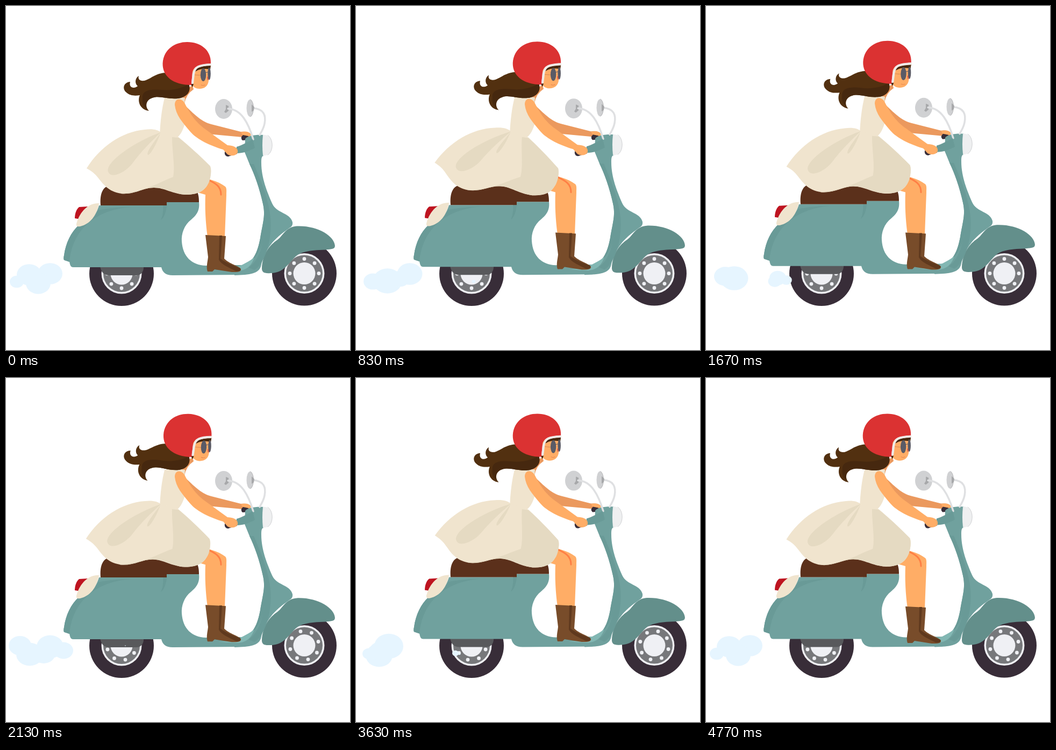
Write an HTML page with a canvas that moves like this. It is 640 px wide and 640 px high and loops after 4.81 s.

```html
<!DOCTYPE html>
<html lang="en">
<head>
<meta charset="utf-8">
<title>Scooter ride</title>
<style>
html, body { margin: 0; width: 100%; height: 100%; overflow: hidden; background: #fff; }
canvas { display: block; width: 640px; height: 640px; }
</style>
</head>
<body>
<canvas id="stage" width="640" height="640"></canvas>
<script>
const ctx = document.getElementById('stage').getContext('2d');
const LOOP = 4810, TAU = Math.PI * 2;
const TEAL = '#70a19e', TEAL_DARK = '#699a97', SKIN = '#ffad66', SKIN_DARK = '#eb995e';
const INK = '#382d38', DRESS = '#f0e4ce', DRESS_DARK = '#e5dac2';

const fill = (color, d) => { ctx.fillStyle = color; ctx.fill(new Path2D(d)); };

function line(color, width, d) {
  ctx.strokeStyle = color;
  ctx.lineWidth = width;
  ctx.lineCap = 'round';
  ctx.stroke(new Path2D(d));
}

function oval(color, x, y, rx, ry = rx) {
  ctx.fillStyle = color;
  ctx.beginPath();
  ctx.ellipse(x, y, rx, ry, 0, 0, TAU);
  ctx.fill();
}

function moved(dx, dy, draw) {
  ctx.save();
  ctx.translate(dx, dy);
  draw();
  ctx.restore();
}

function turned(x, y, angle, draw) {
  ctx.save();
  ctx.translate(x, y);
  ctx.rotate(angle);
  ctx.translate(-x, -y);
  draw();
  ctx.restore();
}

// 0 at the start of each period, 1 in its middle
const swing = (n, period) => (1 - Math.cos(TAU * n / period)) / 2;

function wheel(x, y, angle) {
  oval(INK, x, y, 60);
  oval('#eff0f4', x, y, 37.5);
  oval('#77787b', x, y, 34);
  oval('#eff0f4', x, y, 20.5);
  for (let i = 0; i < 8; i++) {
    const a = angle + i * TAU / 8;
    oval('#eff0f4', x + 27 * Math.cos(a), y + 27 * Math.sin(a), 3.4);
  }
}

function farArm() {
  fill(SKIN_DARK, 'M334 186C354 205 364 215 382 220L437 234Q451 232 456 239Q456 245 440 244L375 238C360 225 345 212 334 198Z');
  fill(SKIN, 'M437 235Q451 232 456 239Q455 244 442 242Z');
  fill(INK, 'M441 240Q435 245 440 250L452 249L451 242Z');
}

function scooter() {
  fill('#58595c', 'M175 484L256 484C257 495 250 501 243 501L192 501C183 501 177 496 175 484Z');
  fill('#be1420', 'M152 373L136 374C131 378 128 386 128 395L140 397Z');
  fill('#638f8b', 'M476 488C477 462 490 445 505 435C515 428 520 411 541 409.5C580 408 611 428 612 446C612 453 605 452 595 453.5C560 454 548 459 540 465C526 477 518 497 492 497C480 498 476 495 476 488Z');
  // rear body and floor
  fill(TEAL, 'M173 371L299 371L299 365L359 365C361 382 353 390 345 397C331 408 326 424 327 438C329 466 345 482 372 483L440 482L440 500L310 501C297 501 291 495 289 486L125 486C120 486 119 481 118 476L109 473C107 473 107 468 108 464C111 441 121 421 135 408C155 404 168 389 173 371Z');
  // front shield and handlebar
  fill(TEAL, 'M425 482L440 482C460 478 468 458 473 432C478 402 483 390 478 368C472 340 462 312 453 294L444 272L445 247C450 241 465 239 480 240L480 278C475 279 475 285 475 292C475 320 486 346 495 367C503 386 528 384 533 402C534 408 531 411 526 414C500 432 482 450 474 485C469 498 455 500 425 501Z');
  fill(TEAL_DARK, 'M109 473C107 473 107 468 108 464C111 441 121 421 135 408C155 404 165 392 171 380C190 376 215 374 235 374C180 377 125 405 118 476Z');
  fill(TEAL_DARK, 'M299 371L300 365C298 384 295 393 288 398C292 390 293 379 292 371Z');
  fill(TEAL_DARK, 'M453 294L461 294C474 325 485 350 491 385C498 430 482 480 462 491L440 482C460 478 468 458 473 432C478 402 483 390 478 368C472 340 462 312 453 294Z');
  fill(TEAL, 'M440 482C466 477 479 445 482 420C474 462 464 490 430 494Z');
  fill('#82b7b3', 'M395 491C425 490 442 482 462 468C456 485 447 491 432 493Z');
  fill(DRESS, 'M173 367C155 366 138 380 131 405C130 410 134 411 138 410C156 406 169 390 173 367Z');
  fill('#5b301b', 'M176 371C174 350 180 335 194 334L350 338C358 345 359 355 359 365L299 365L299 371Z');
  fill('#eeeff0', 'M478 240C501 236 501 282 478 278Q476 259 478 240Z');
  line('#bfc1c3', .7, 'M487 240.5C498 247 498 271 487 277');
}

function mirrors() {
  oval('#d0d1d3', 405, 191.5, 16, 18.5);
  fill('#a7a8aa', 'M409 184L414 186L414 195L409 199L406 197L409 192Z');
  line('#dfe0e2', 3.5, 'M413 191C438 192 451 218 460 248');
  line('#dfe0e2', 3.5, 'M459 190C480 191 484 204 481 219C479 229 475 234 472 240');
  oval('#d0d1d3', 454, 190, 6.5, 16);
  line('#a7a8aa', .8, 'M455 174C463 180 462 201 455 206');
  fill('#a7a8aa', 'M457 183L462 188L461 194L457 197Z');
}

function leg() {
  fill(SKIN, 'M350 318C373 319 395 326 408 336C411 339 410 345 410 352L407 430L375 430C371 400 370 375 371 351L350 345Z');
  line('#ff7f45', 3, 'M374 322.5C391 330 400 336 400 351');
  fill('#784c2a', 'M371 426L409 428L406 470C416 480 432 483 437 489C438 495 431 495 420 495L388 490L384 494L375 494C372 486 375 476 376 467Z');
  fill('#5f391e', 'M397 427L402 427L399 470C412 480 427 484 436 488C437 493 433 494 427 493C416 487 400 481 396 472Z');
}

function bodice() {
  fill(SKIN_DARK, 'M325 160L347 148L349 155Q335 164 332 182L316 180Z');
  fill(DRESS, 'M295 171Q314 167 333 171C331 185 337 200 334 214C330 230 325 240 318 245L286 240C287 215 290 190 295 171Z');
}

function skirt() {
  fill(DRESS, 'M150 302C175 262 215 234 258 230C272 228 282 230 288 235L321 244C338 258 360 278 379 297C384 303 381 318 376 330C370 345 355 351 335 351C310 350 295 338 275 338C255 338 240 351 215 349C190 346 180 330 170 318C163 309 155 305 150 302Z');
  fill(DRESS_DARK, 'M309 244L321 245C338 258 360 278 380 298C383 310 380 325 376 331C368 346 352 351 335 351C312 350 300 338 275 338C255 338 240 351 213 349C262 345 284 328 311 318C315 300 309 270 309 244Z');
  fill(DRESS_DARK, 'M288 235C240 252 185 290 190 308C195 323 222 310 235 293C251 271 270 252 288 235Z');
  fill(DRESS_DARK, 'M287 237C277 251 260 272 264 277C268 278 280 258 287 237Z');
}

function hair() {
  fill('#523010', 'M300 124C278 124 268 137 257 139C249 140 245 136 247 130C240 134 239 144 245 149C238 155 228 152 231 141C219 142 216 153 223 160C231 168 241 167 249 166C244 177 249 193 266 195C257 186 262 174 272 171C285 166 300 174 320 172C335 170 346 160 340 145L320 130Z');
  fill('#46280f', 'M254 172C252 157 268 154 290 156C310 158 330 152 340 145C345 160 335 170 320 172C300 174 285 166 272 171C262 174 258 183 262 191C255 186 253 178 254 172Z');
}

function head() {
  fill(SKIN, 'M346 146L347 116L381 111C378 122 378 129 377 139C376 149 369 154 360 154C353 154 349 151 346 146Z');
  fill('#46280f', 'M350 123C354 113 367 112 381 110L380 118C369 116 360 117 354 121ZM343 145L349 145L347 151Z');
  line('#d98b55', 1, 'M349 128L363 129');
  line('#e7854f', 1, 'M363 147Q366 149 370 147');
  oval('#5a5b66', 367, 128, 5.2, 12);
  oval('#5a5b66', 378, 126, 2.8, 11.5);
  line('#5a5b66', 1, 'M371 124L376 123');
  line('#d93a3a', 1.3, 'M375 132L375.5 137');
  fill('#db3232', 'M345 147C310 147 291 130 291.5 107C293 80 315 67 337 67C362 67 382 82 381 107C360 109 350 112 347 122Z');
  line('#f0ebe8', 4.2, 'M380 109C359 110 351 113 349 126L347 143');
}

function nearArm() {
  fill(INK, 'M411 267L430 264L430 275L413 280Z');
  oval(INK, 412.5, 273.5, 5.7, 6.5);
  fill(TEAL_DARK, 'M429 262C440 259 449 253 459 248L463 264C452 270 441 274 429 274Z');
  fill(SKIN, 'M314 184C314 170 328 171 333 182C345 205 355 218 372 230L412 259C426 260 432 264 431 272C429 279 418 280 412 276L404 267C380 260 355 248 343 234C328 216 316 203 314 184Z');
}

// a puff passes through keys of frame, x, y, radius, then drifts off and shrinks away
function puff(n, ...keys) {
  const [end, x, y] = keys[keys.length - 1];
  keys.push([end + 8, x - 25, y, 0]);
  for (let at = n; at < n + 180; at += 60) {
    const i = keys.findIndex(key => key[0] > at);
    if (i < 1) continue;
    const a = keys[i - 1], b = keys[i], u = (at - a[0]) / (b[0] - a[0]);
    const [px, py, r] = [1, 2, 3].map(j => a[j] + (b[j] - a[j]) * u);
    oval('#e6f5ff', px, py, r, r * .86);
  }
}

function smoke(n) {
  const at = n % 60 || 59;
  puff(at, [11, 253, 513, .8], [31, 185, 512, 6], [53, 82, 500, 25], [59, 82, 498, 23], [71, 39, 512, 23], [91, 24, 513, 12]);
  puff(at, [26, 205, 514, 0], [31, 192, 513, 2.6], [53, 107, 507, 18], [59, 84, 499, 20], [71, 74, 507, 29], [91, 43, 516, 25]);
  puff(at, [31, 186, 512, 3], [53, 70, 512, 22], [59, 60, 516, 23], [71, 68, 508, 18]);
  puff(at, [53, 222, 498, .8], [59, 200, 500, .1], [71, 139, 498, 20], [91, 61, 499, 27], [113, 44, 514, 25], [119, 43, 500, 23]);
  puff(at, [61, 190, 507, 0], [71, 119, 507, 14.5], [91, 45, 508, 20], [113, 26, 498, 21], [119, 20, 513, 13]);
}

// 25 poses per second, shown on a 30 Hz clock of whole centiseconds
function poseAt(ms) {
  const tick = Math.min(143, Math.floor((3 * Math.floor(ms / 10) + 1) / 10));
  return Math.max(0, Math.ceil(tick * 5 / 6 - .5));
}

function draw(n) {
  ctx.fillStyle = '#fff';
  ctx.fillRect(0, 0, 640, 640);
  const spin = n * TAU / 24, nod = swing(n, 10);
  wheel(215, 498, spin);
  wheel(555, 497.5, spin);
  moved(0, -2.5 * swing(n, 7.5), () => {
    farArm();
    scooter();
    mirrors();
    moved(0, -4.3 * swing(n, 8), leg);
    bodice();
    turned(300, 240, .065 * swing(n, 60 / 7), skirt);
    turned(340, 165, .039 * nod, () => {
      turned(325, 140, .05 * nod, hair);
      head();
    });
    nearArm();
  });
  smoke(n);
}

const start = performance.now();
function tick() {
  draw(poseAt((performance.now() - start) % LOOP));
  requestAnimationFrame(tick);
}
tick();
</script>
</body>
</html>
```
